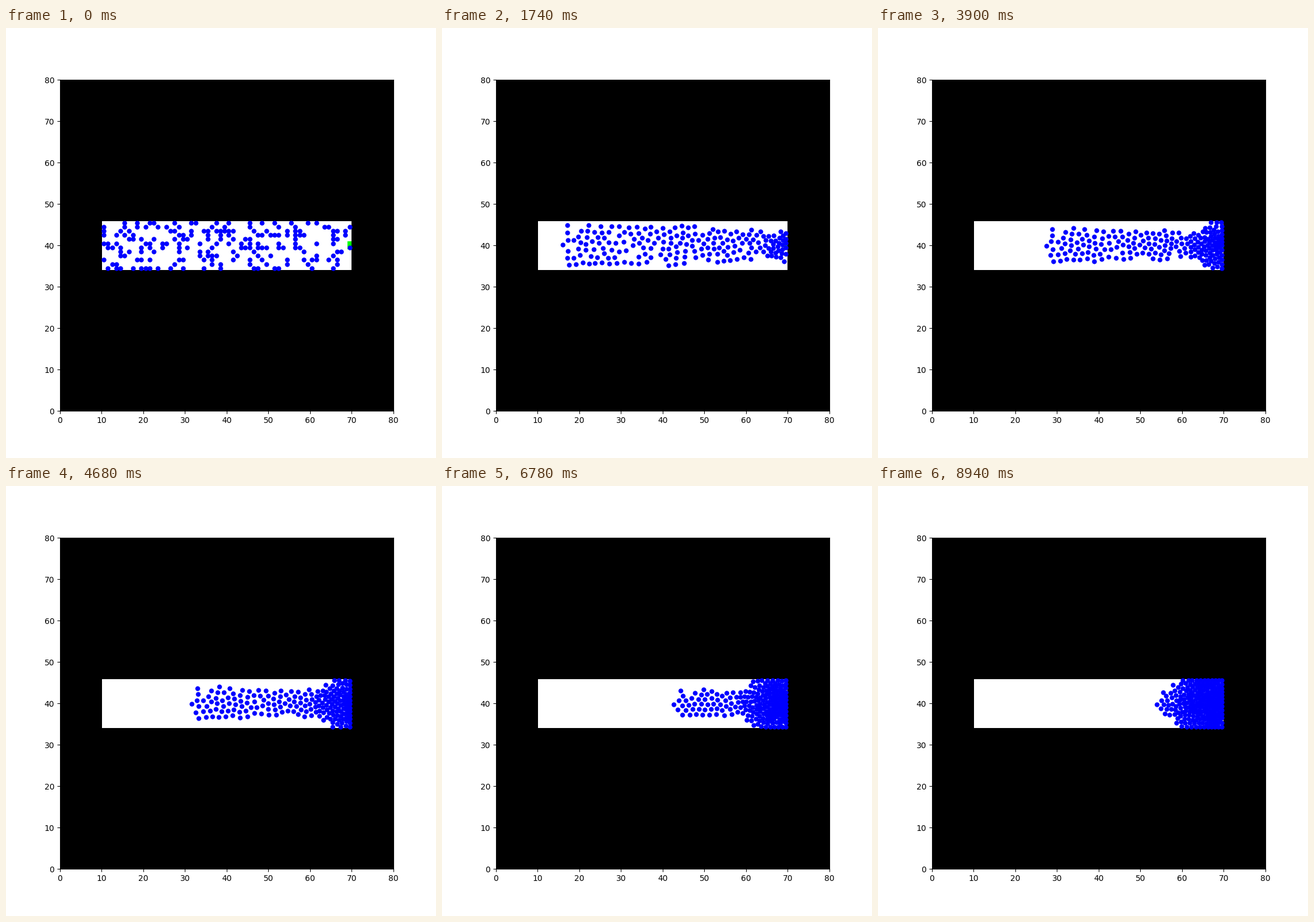
These frames come from a looping animation (748x748 px, 9000 ms). A matplotlib script:

```python
import numpy as np
import matplotlib.pyplot as plt
from matplotlib.animation import FuncAnimation
from matplotlib.patches import Rectangle

SIZE, DPI = 748, 100
FRAMES, INTERVAL = 150, 60
X0, X1, Y0, Y1 = 10, 70, 34, 46      # corridor
EXIT = np.array([69.6, 40.0])

SPEED = 0.328                        # walking speed, units per frame
TAU = 9.2                            # frames needed to reach it
DRIVE = SPEED / TAU
GAP, SOFT = 1.1, 0.13                # personal distance and its falloff
STEPS = 5                            # substeps per frame

# people in each stretch of five columns
CROWD = [19, 18, 15, 18, 12, 21, 13, 22, 15, 15, 9, 15]


def start_cells(rng):
    cells = [(69.5, 39.5)]           # one person already stands in the exit
    for k, count in enumerate(CROWD):
        free = [(X0 + 5 * k + i + 0.5, Y0 + j + 0.5)
                for i in range(5) for j in range(Y1 - Y0)]
        free = [c for c in free if c not in [(69.5, 39.5), (69.5, 40.5)]]
        picks = rng.choice(len(free), count, replace=False)
        cells += [free[p] for p in picks]
    return np.array(cells)


def wall_push(dist):
    return 0.6 * DRIVE * np.exp((0.5 - dist) / 0.15)


def acceleration(pos, vel):
    to_exit = EXIT - pos
    dist = np.hypot(*to_exit.T)[:, None]
    acc = (SPEED * to_exit / np.maximum(dist, 0.5) - vel) / TAU

    diff = pos[:, None] - pos[None]
    gap = np.sqrt((diff ** 2).sum(axis=2)) + 1e-6
    push = DRIVE * np.exp((GAP - np.maximum(gap, 0.6)) / SOFT) / gap
    np.fill_diagonal(push, 0)
    acc += (push[:, :, None] * diff).sum(axis=1)

    acc[:, 0] -= wall_push(X1 - pos[:, 0])
    acc[:, 1] += wall_push(pos[:, 1] - Y0) - wall_push(Y1 - pos[:, 1])
    return acc


def simulate():
    pos = start_cells(np.random.default_rng(12))
    vel = np.zeros_like(pos)
    low, high = np.array([X0 + 0.4, Y0 + 0.4]), np.array([X1 - 0.4, Y1 - 0.4])
    dt = 1 / STEPS
    path = [pos.copy()]
    for _ in range(FRAMES - 1):
        for _ in range(STEPS):
            vel += acceleration(pos, vel) * dt
            pos += vel * dt
            vel[(pos < low) | (pos > high)] = 0
            pos = np.clip(pos, low, high)
        path.append(pos.copy())
    return path


path = simulate()

fig = plt.figure(figsize=(SIZE / DPI, SIZE / DPI), dpi=DPI)
ax = fig.add_axes([94 / SIZE, 81.8 / SIZE, 579.7 / SIZE, 576 / SIZE])
ax.set_xlim(0, 80)
ax.set_ylim(0, 80)
ax.set_facecolor("black")
for x, y, w, h, color in [(X0 + 0.07, Y0 + 0.05, 59.93, 11.82, "white"),
                          (69, 39, 1, 2, "lime")]:
    ax.add_patch(Rectangle((x, y), w, h, fc=color, lw=0, antialiased=False))
dots, = ax.plot([], [], "o", color="blue", ms=5)


def draw(i):
    dots.set_data(*path[i].T)
    return dots,


anim = FuncAnimation(fig, draw, frames=FRAMES, interval=INTERVAL,
                     init_func=lambda: draw(0), repeat=True, repeat_delay=0)
plt.show()
```
